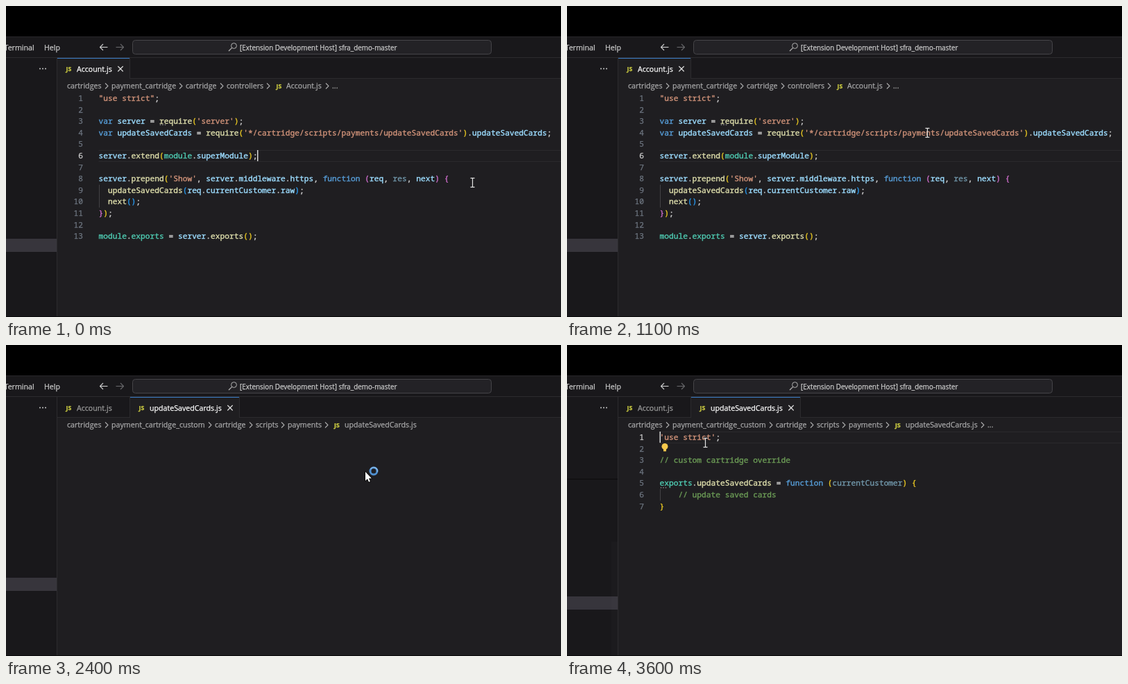
An HTML page with a canvas that plays this animation: 800 by 449 pixels, repeating every 3650 ms.

```html
<!DOCTYPE html>
<html lang="en">
<head>
<meta charset="utf-8">
<title>Editor: go to module</title>
<style>
  html, body { margin: 0; width: 100%; height: 100%; overflow: hidden; background: #000; }
  canvas { display: block; width: 800px; height: 449px; }
</style>
</head>
<body>
<canvas id="stage" width="800" height="449"></canvas>
<script>
const ctx = document.getElementById('stage').getContext('2d');

const LOOP = 3650;
const LINK_ON = 1200, TAB_OPEN = 2300, CODE_SHOWN = 2550, TREE_MOVED = 2650;
const UNUSED_DIM = 3200, BULB_ON = 3300;

const UI = '"Open Sans", "Noto Sans", sans-serif';
const MONO = '"Noto Sans Mono", "DejaVu Sans Mono", monospace';
const CODE_X = 133.5, CODE_Y = 137, LINE = 16.6, CODE_SIZE = 11.22, CHAR = CODE_SIZE * 0.6;

const C = {
  side: '#19181b', editor: '#1f1e21', border: '#2c2b2e', text: '#cccccc',
  dim: '#9d9d9d', crumb: '#a9a9aa', number: '#6e7681', accent: '#3a7cc6'
};

// Keys used in the code lines below
const INK = {
  k: '#569cd6', v: '#9cdcfe', f: '#dcdcaa', s: '#ce9178', t: '#4ec9b0',
  p: '#cccccc', c: '#6a9955', u: '#7096a9', a: '#e6c522', b: '#c96bc6',
  d: '#2896e8', l: '#4a8fe0'
};

// Alternating colour key and text
const accountCode = [
  's~"use strict"~p~;',
  '',
  "k~var ~v~server ~p~= ~f~require~a~(~s~'server'~a~)~p~;",
  "k~var ~v~updateSavedCards ~p~= ~f~require~a~(~s~'~link~*/cartridge/scripts/payments/updateSavedCards~s~'~a~)~p~.~v~updateSavedCards~p~;",
  '',
  'v~server~p~.~f~extend~a~(~t~module~p~.~v~superModule~a~)~p~;',
  '',
  "v~server~p~.~f~prepend~a~(~s~'Show'~p~, ~v~server~p~.~v~middleware~p~.~v~https~p~, ~k~function ~b~(~v~req~p~, ~u~res~p~, ~v~next~b~) {",
  'p~  ~f~updateSavedCards~d~(~v~req~p~.~v~currentCustomer~p~.~v~raw~d~)~p~;',
  'p~  ~f~next~d~()~p~;',
  'b~}~a~)~p~;',
  '',
  't~module~p~.~t~exports ~p~= ~v~server~p~.~f~exports~a~()~p~;'
];

const cardsCode = [
  "s~'use strict'~p~;",
  '',
  'c~// custom cartridge override',
  '',
  't~exports~p~.~f~updateSavedCards ~p~= ~k~function ~a~(~arg~currentCustomer~a~) {',
  'c~    // update saved cards',
  'a~}'
];

function rect(x, y, w, h, color) {
  ctx.fillStyle = color;
  ctx.fillRect(x, y, w, h);
}

// The hairline stroke gives the text a slightly heavier weight
function label(str, x, y, color = C.text, size = 10.65, font = UI, weight = 400, heavy = 0.25) {
  ctx.font = `${weight} ${size}px ${font}`;
  ctx.fillStyle = ctx.strokeStyle = color;
  ctx.lineWidth = heavy;
  ctx.lineJoin = 'round';
  ctx.fillText(str, x, y);
  ctx.strokeText(str, x, y);
}

function stroke(color, width, ...points) {
  ctx.strokeStyle = color;
  ctx.lineWidth = width;
  ctx.beginPath();
  points.forEach(([x, y], i) => i ? ctx.lineTo(x, y) : ctx.moveTo(x, y));
  ctx.stroke();
}

function disc(x, y, r, color) {
  ctx.fillStyle = color;
  ctx.beginPath();
  ctx.arc(x, y, r, 0, Math.PI * 2);
  ctx.fill();
}

function dots(x, y, gap, r, color) {
  for (let i = 0; i < 3; i++) disc(x + i * gap, y, r, color);
}

const fileTag = (x, y) => label('JS', x, y, '#cbcb41', 8.8, UI, 700);
const chevron = (x, y) => stroke(C.crumb, 1.1, [x - 2, y - 4], [x + 2, y], [x - 2, y + 4]);

function arrow(x, y, dir, color) {
  stroke(color, 1.1, [x - 5.5, y], [x + 5.5, y]);
  const tip = x + dir * 5.5;
  stroke(color, 1.1, [tip - dir * 4.5, y - 4.5], [tip, y], [tip - dir * 4.5, y + 4.5]);
}

function drawFrame() {
  rect(0, 0, 800, 449, '#000');
  rect(0, 44, 800, 405, C.side);
  rect(0, 44, 800, 1, '#28272a');
  rect(74, 104, 726, 345, C.editor);
  rect(0, 74, 800, 1, C.border);
  rect(73, 75, 1, 374, C.border);
  rect(74, 104, 726, 1, C.border);

  label('Terminal', -2.5, 63.5);
  label('Help', 55, 63.5);
  arrow(141, 59.5, -1, C.text);
  arrow(164, 59.5, 1, '#67676a');

  ctx.beginPath();
  ctx.roundRect(182.5, 49.5, 517, 20, 4);
  ctx.fillStyle = '#232226';
  ctx.fill();
  ctx.strokeStyle = '#454448';
  ctx.lineWidth = 1;
  ctx.stroke();

  ctx.beginPath();
  ctx.arc(328.5, 57.5, 3.9, 0, Math.PI * 2);
  ctx.strokeStyle = '#b4b4b4';
  ctx.stroke();
  stroke('#b4b4b4', 1.2, [325.7, 60.3], [321, 65]);
  label('[Extension Development Host] sfra_demo-master', 337, 63.5, C.text, 9.88);
  dots(49, 90.5, 4, 1, C.text);
}

function drawTab(x, w, name, active) {
  if (active) {
    rect(x, 75, w, 30, C.editor);
    rect(x, 75, w, 1, C.accent);
    const cx = x + w - 13;
    stroke('#dddddd', 1.2, [cx - 3.7, 87], [cx + 3.7, 94.5]);
    stroke('#dddddd', 1.2, [cx + 3.7, 87], [cx - 3.7, 94.5]);
  }
  rect(x + w, 75, 1, 29, C.border);
  fileTag(x + 12.5, 93.5);
  label(name, x + 28, 94.7, active ? '#ffffff' : C.dim);
}

function drawCrumbs(parts, chevrons, tagX) {
  parts.forEach(([name, x]) => label(name, x, 119, C.crumb));
  chevrons.forEach(x => chevron(x, 115.5));
  fileTag(tagX, 118.5);
}

function drawSidebar(t) {
  const moved = t >= TREE_MOVED;
  rect(0, moved ? 363 : 336, 73, 19, '#37353c');
  if (!moved) return;
  rect(0, 193, 73, 1.2, '#0d0c0e');
  const fade = Math.max(0.08, 1 - Math.max(0, t - 2800) / 700);
  rect(64, 284, 9, 165, `rgba(121, 121, 125, ${0.42 * fade})`);
}

function drawCode(lines, activeLine, tint) {
  const top = 125 + (activeLine - 1) * LINE;
  rect(CODE_X, Math.round(top), 667, 1, '#2b2a2d');
  rect(CODE_X, Math.round(top + LINE) - 1, 667, 1, '#2b2a2d');

  lines.forEach((line, i) => {
    const y = CODE_Y + i * LINE;
    const num = String(i + 1);
    label(num, 111 - num.length * CHAR, y, i + 1 === activeLine ? '#d0d0d0' : C.number, CODE_SIZE, MONO);
    const parts = line.split('~');
    let x = CODE_X;
    for (let j = 0; j + 1 < parts.length; j += 2) {
      const key = tint[parts[j]] || parts[j], str = parts[j + 1];
      label(str, x, y, INK[key], CODE_SIZE, MONO, 500, 0.4);
      if (key === 'l') rect(x, y + 1.5, str.length * CHAR, 1, INK.l);
      x += str.length * CHAR;
    }
  });
}

function caret(x, line, on) {
  if (on) rect(x, 125 + (line - 1) * LINE, 1.5, LINE - 0.5, '#d8d8d8');
}

function drawAccount(t) {
  drawTab(74, 104, 'Account.js', true);
  drawCrumbs([['cartridges', 88], ['payment_cartridge', 152], ['cartridge', 259],
    ['controllers', 318], ['Account.js', 404], ['...', 470]],
    [145, 252, 311, 378, 463], 389.5);
  drawCode(accountCode, 6, { link: t >= LINK_ON ? 'l' : 's' });
  rect(134, 258, 1, 33, '#424145');
  dots(222.5, 171.5, 3.5, 0.8, '#a0a0a0');
  caret(362, 6, (t + 400) % 1000 < 500);
}

function drawCards(t) {
  drawTab(74, 104, 'Account.js', false);
  drawTab(179, 157, 'updateSavedCards.js', true);
  drawCrumbs([['cartridges', 88], ['payment_cartridge_custom', 152], ['cartridge', 301],
    ['scripts', 360], ['payments', 406], ['updateSavedCards.js', 488]],
    [145, 294, 353, 399, 462], 473);
  if (t < CODE_SHOWN) return;

  chevron(599, 115.5);
  label('...', 606, 119, C.crumb);
  const unused = t >= UNUSED_DIM;
  drawCode(cardsCode, 1, { arg: unused ? 'u' : 'v' });
  rect(134, 208, 1, 16.6, '#424145');
  if (unused) dots(135.5, 206, 3.5, 0.8, '#a0a0a0');
  if (t >= BULB_ON) {
    disc(141, 146.5, 4.5, '#f5c84c');
    rect(139, 150, 4, 3.5, '#f5c84c');
  }
  caret(133.5, 1, (t - CODE_SHOWN) % 1000 < 500);
}

function iBeam(x, y) {
  const shape = [[[x - 3, y - 6.5], [x + 3, y - 6.5]], [[x, y - 6.5], [x, y + 6.5]],
    [[x - 3, y + 6.5], [x + 3, y + 6.5]]];
  shape.forEach(([a, b]) => stroke('#e4e4e4', 1.2, a, b));
}

function outlined(path, x, y) {
  ctx.save();
  ctx.translate(x, y);
  const shape = new Path2D(path);
  ctx.lineJoin = 'round';
  ctx.lineWidth = 1.6;
  ctx.strokeStyle = '#000';
  ctx.stroke(shape);
  ctx.fillStyle = '#fff';
  ctx.fill(shape);
  ctx.restore();
}

const HAND = 'M-1.5 .8Q0-1 1.6 .8V6L5.6 7Q7.7 7.6 7.4 10.5L6.6 15.5V19H-1.8V17L-5.4 12Q-6 9.6-3.9 9.6L-1.5 11.6Z';
const POINTER = 'M0 0V13L3 10.2L5 14.8L7 13.9L5 9.5H9Z';

function busyRing(x, y) {
  ctx.lineWidth = 3;
  ctx.strokeStyle = '#4f8fce';
  ctx.beginPath();
  ctx.arc(x, y, 5, 0, Math.PI * 2);
  ctx.stroke();
  ctx.lineWidth = 1.2;
  ctx.strokeStyle = '#8fc0ee';
  ctx.beginPath();
  ctx.arc(x, y, 5.4, -2.6, 0.2);
  ctx.stroke();
}

// Mouse stops: time, x, y
const stops = [[0, 672.5, 255], [100, 672.5, 255], [650, 499.5, 189], [750, 499.5, 189],
  [1050, 519.5, 183], [2850, 519.5, 183], [3500, 199.5, 141], [LOOP, 199.5, 141]];

function mouseAt(t) {
  const i = stops.findIndex((s, n) => n && t <= s[0]);
  const [t0, x0, y0] = stops[i - 1], [t1, x1, y1] = stops[i];
  const u = (t - t0) / (t1 - t0), e = u * u * (3 - 2 * u);
  return [x0 + (x1 - x0) * e, y0 + (y1 - y0) * e];
}

function drawMouse(t) {
  const [x, y] = mouseAt(t);
  if (t < LINK_ON || t >= CODE_SHOWN) iBeam(x, y);
  else if (t < TAB_OPEN) outlined(HAND, x, y);
  else {
    outlined(POINTER, x - 1.5, y);
    busyRing(x + 10.5, y - 1);
  }
}

function render(now) {
  const t = now % LOOP;
  drawFrame();
  drawSidebar(t);
  (t < TAB_OPEN ? drawAccount : drawCards)(t);
  rect(0, 448, 800, 1, '#0b0b0c');
  drawMouse(t);
}

const start = performance.now();
function tick() {
  render(performance.now() - start);
  requestAnimationFrame(tick);
}
tick();
</script>
</body>
</html>
```
